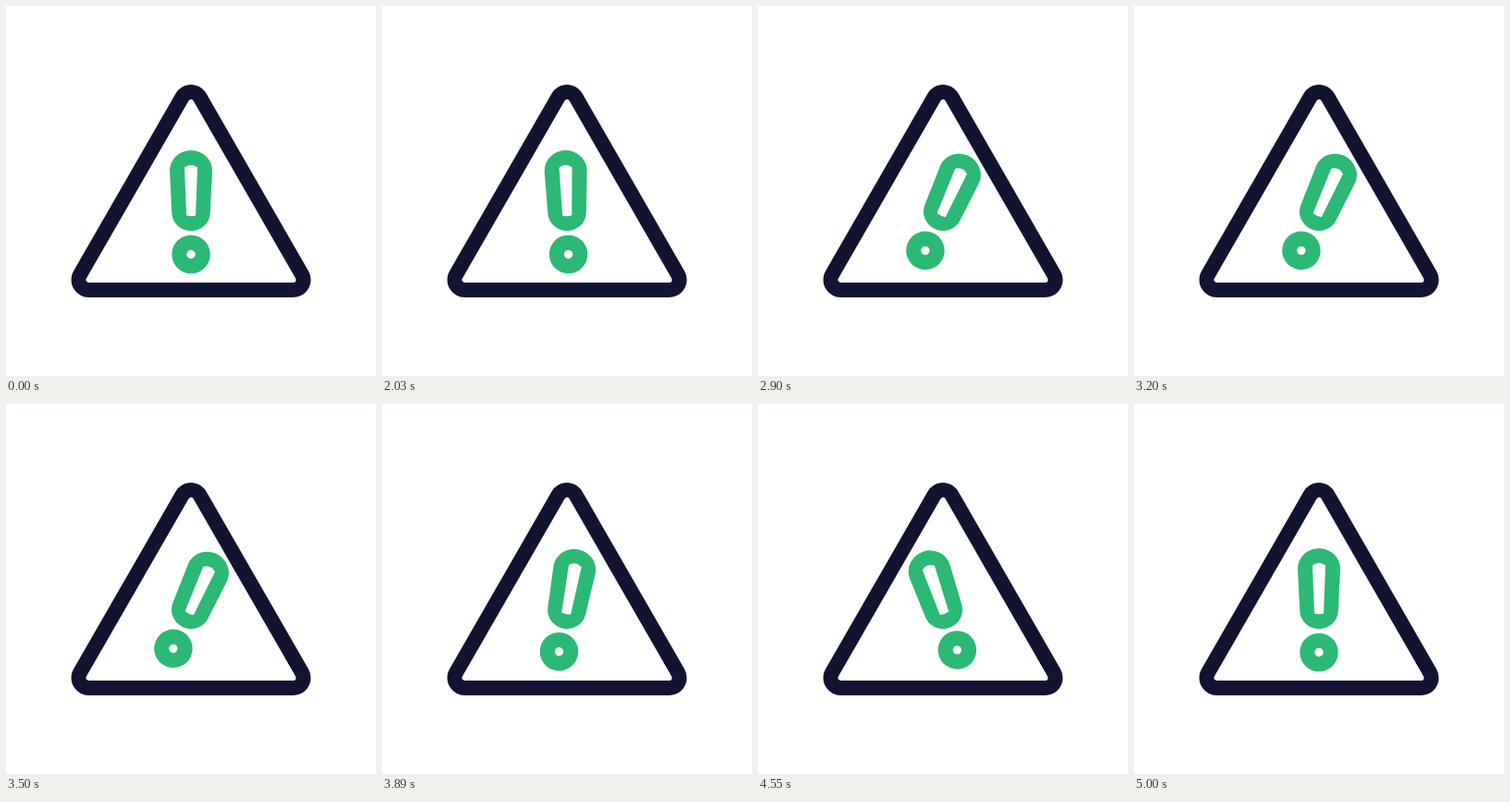
An HTML page that plays this animation: 400x400 px, repeating every 5060 ms.

```html
<!DOCTYPE html>
<html lang="en">
<head>
<meta charset="utf-8">
<title>Warning sign</title>
<style>
  html, body { margin: 0; width: 100%; height: 100%; overflow: hidden; background: #fff; }
  svg { display: block; width: 100%; height: 100%; }
  polygon { stroke-linejoin: round; }
</style>
</head>
<body>
<svg viewBox="0 0 400 400">
  <!-- rounded triangle: dark outside, white inside -->
  <polygon points="200,104 89.5,296 310.5,296" fill="#121331" stroke="#121331" stroke-width="38"/>
  <polygon points="200,104 89.5,296 310.5,296" fill="#fff" stroke="#fff" stroke-width="6"/>
  <g id="mark">
    <path fill="#2cb875" fill-rule="evenodd" d="
      M177 178 A23 22 0 0 1 223 178 L220.8 223 A20.8 20 0 0 1 179.2 223 Z
      M193 174.5 Q200 168.8 207 174.5 L205 226.5 Q200 228 195 226.5 Z"/>
    <circle cx="200" cy="268.5" r="12.7" fill="none" stroke="#2cb875" stroke-width="16"/>
  </g>
</svg>
<script>
  const LOOP = 5060, START = 2000, STEP = 30, LAST = 100;
  const mark = document.getElementById('mark');

  // [step, angle]: swings left and right, then settles
  const keys = [[0, 0]];
  for (let s = 6; s <= 86; s += 10) {
    keys.push([s, -25]);
    if (s < 86) keys.push([s + 5, 30]);
  }
  keys.push([91, 8], [LAST, 0]);

  const ease = t => t * t * (3 - 2 * t);

  function angleAt(step) {
    const i = keys.findIndex(k => k[0] >= step);
    if (i < 1) return 0;
    const [s0, a0] = keys[i - 1], [s1, a1] = keys[i];
    return a0 + (a1 - a0) * ease((step - s0) / (s1 - s0));
  }

  function draw(ms) {
    const step = Math.floor((ms % LOOP - START) / STEP);
    const angle = angleAt(Math.max(0, Math.min(LAST, step)));
    mark.setAttribute('transform', `rotate(${angle.toFixed(3)} 200 222)`);
  }

  const begin = performance.now();
  function tick() {
    draw(performance.now() - begin);
    requestAnimationFrame(tick);
  }
  tick();
</script>
</body>
</html>
```
